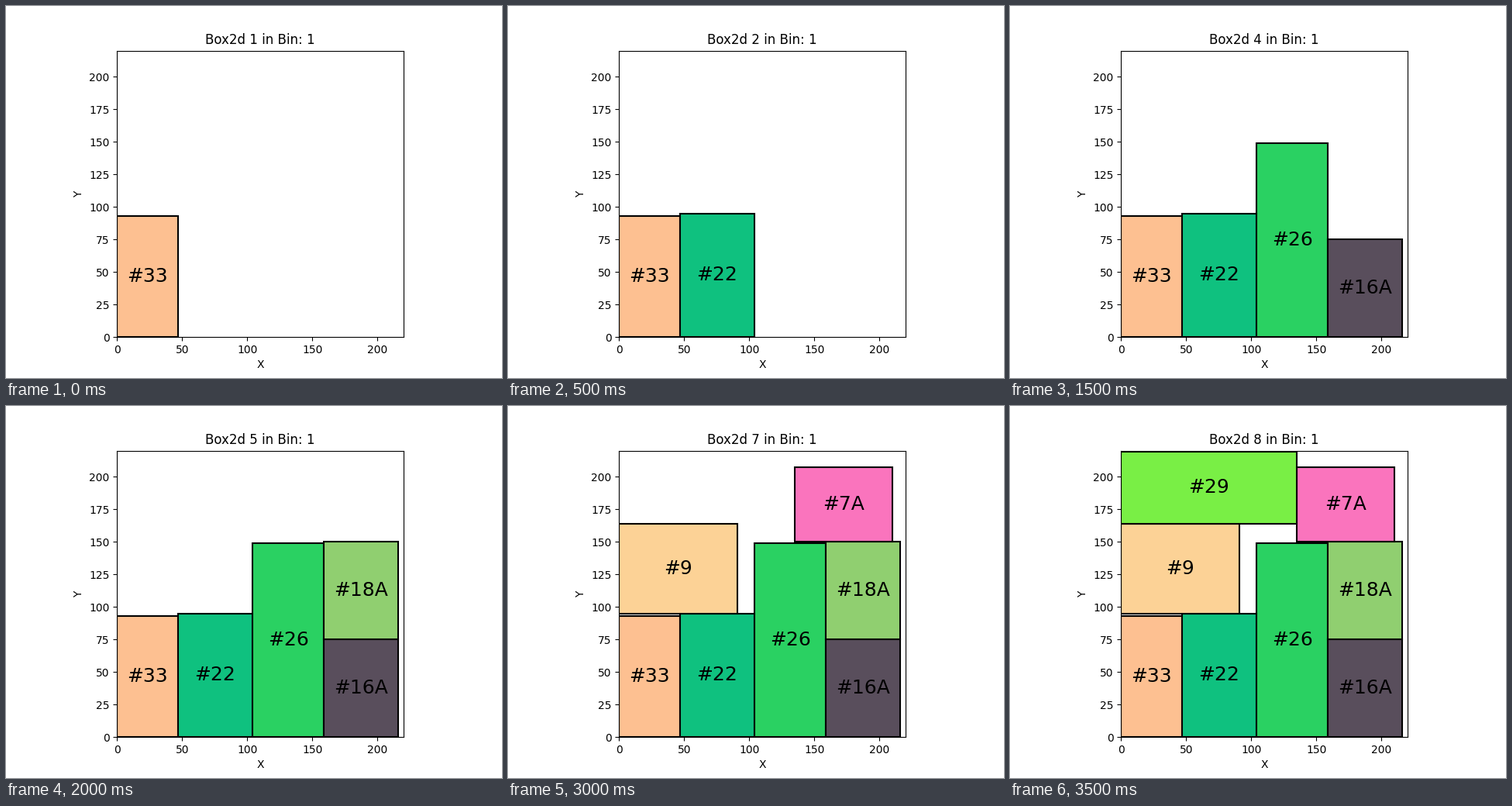
Recreate the animation shown at these times as a matplotlib script. Size 640 by 480 pixels, loop 4000 ms.

```python
import matplotlib.pyplot as plt
from matplotlib.animation import FuncAnimation
from matplotlib.patches import Rectangle

SIZE = 220
STEP_MS = 500

# label, x, y, width, height, colour, in packing order
BOXES = [
    ("#33", 0, 0, 47, 93, "#fdc091"),
    ("#22", 47, 0, 57, 95, "#0fc17f"),
    ("#26", 104, 0, 55, 149, "#2ad162"),
    ("#16A", 159, 0, 57, 75, "#594e5c"),
    ("#18A", 159, 75, 57, 75, "#90cf70"),
    ("#9", 0, 95, 91, 69, "#fcd296"),
    ("#7A", 135, 150, 75, 57, "#fa74bd"),
    ("#29", 0, 164, 135, 55, "#79ef45"),
]

plt.rcParams["font.family"] = "DejaVu Sans"
fig, ax = plt.subplots(figsize=(6.4, 4.8), dpi=100)
ax.set_aspect("equal")
ax.set(xlim=(0, SIZE), ylim=(0, SIZE), xlabel="X", ylabel="Y",
       xticks=range(0, SIZE, 50), yticks=range(0, SIZE, 25))
title = ax.set_title("")


def add_box(label, x, y, w, h, color):
    patch = ax.add_patch(Rectangle((x, y), w, h, facecolor=color,
                                   edgecolor="black", linewidth=1.5))
    text = ax.text(x + w / 2, y + h / 2, label, fontsize=18,
                   ha="center", va="center")
    return patch, text


items = [add_box(*box) for box in BOXES]


def update(step):
    title.set_text(f"Box2d {step + 1} in Bin: 1")
    for i, parts in enumerate(items):
        for part in parts:
            part.set_visible(i <= step)
    return [title]


anim = FuncAnimation(fig, update, frames=len(BOXES), interval=STEP_MS,
                     repeat=True, repeat_delay=0)
plt.show()
```
